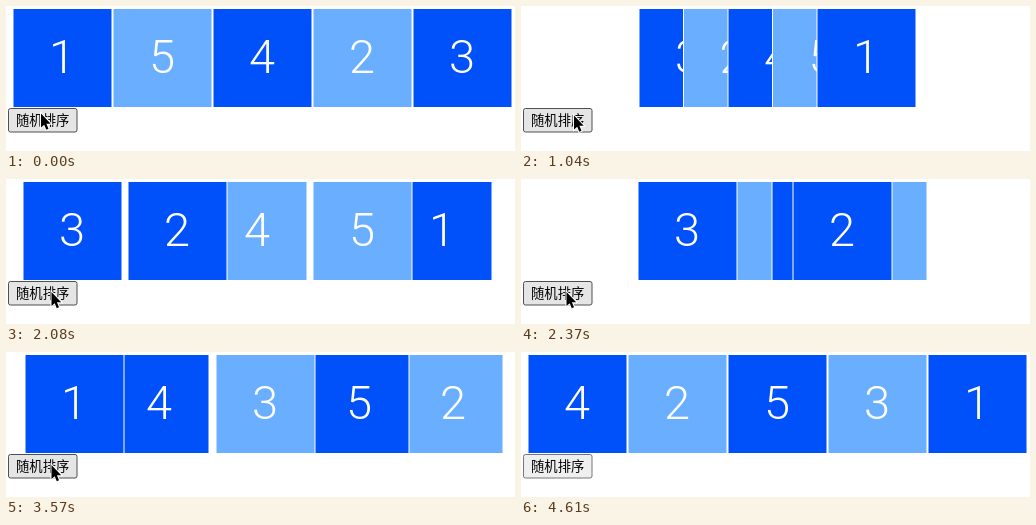
Write an HTML page that moves like this. It is 509 px wide and 145 px high and loops after 4760 ms.

```html
<!DOCTYPE html>
<html lang="zh-CN">
<head>
<meta charset="utf-8">
<title>随机排序</title>
<style>
  html, body { margin: 0; width: 100%; height: 100%; overflow: hidden; background: #fff; }
  svg { display: block; width: 509px; height: 145px; }
  .digit { font: 300 47px Roboto, "Liberation Sans", sans-serif; fill: #fff; text-anchor: middle; }
  .label { font: 13.333px "Noto Sans CJK SC", "Noto Sans CJK", sans-serif; fill: #000; }
</style>
</head>
<body>
<svg viewBox="0 0 509 145">
  <g id="row"></g>
  <rect id="button" x="2.5" y="102.5" width="68.5" height="23.5" rx="2"/>
  <text class="label" x="10" y="118.5">随机排序</text>
  <path id="cursor" d="M0 0V14L3.2 11.2L5.3 16.2L7.5 15.3L5.4 10.3H9.7Z"
    fill="#000" stroke="#fff" stroke-width="2" paint-order="stroke"/>
</svg>
<script>
const LOOP = 4760, TICKS = 32, TICK = LOOP / TICKS;
const PITCH = 100, LEFT = 6.5, TOP = 2;
const DARK = '#0051fa', LIGHT = '#6aafff';

// Each shuffle slides linearly for four ticks from its start.
const SLIDE = 4;
const STARTS = [4.11, 13.8, 23.88];
const ORDERS = ['15423', '32451', '14352', '42531'];
const PRESS = 4;

// Pointer path: [tick, x, y], straight between points
const PATH = [
  [5, 35, 107.5], [7, 53, 109.5], [11, 45.5, 113], [24, 45.5, 113], [25, 54, 114],
  [26, 262.3, 117.5], [28, 322, 118], [29, 322, 126], [30, 440, 143], [31, 500, 170]
];

const byId = id => document.getElementById(id);
const clamp = v => Math.min(1, Math.max(0, v));
const mix = (a, b, p) => a + (b - a) * p;

function add(parent, tag, attrs = {}) {
  const el = document.createElementNS('http://www.w3.org/2000/svg', tag);
  set(el, attrs);
  return parent.appendChild(el);
}

function set(el, attrs) {
  for (const k in attrs) el.setAttribute(k, attrs[k]);
}

// One tile per slot; later slots paint over earlier ones.
const tiles = Array.from(ORDERS[0], (_, slot) => {
  const g = add(byId('row'), 'g');
  add(g, 'rect', { width: 100, height: 100, fill: '#fff' });
  add(g, 'rect', { x: 1, y: 1, width: 98, height: 98, fill: slot % 2 ? LIGHT : DARK });
  const digit = add(g, 'text', { class: 'digit', x: 49.5, y: 65.3 });
  return { g, digit };
});

function drawTiles(tick) {
  const n = STARTS.filter(s => s <= tick).length;
  const to = ORDERS[n], from = ORDERS[Math.max(0, n - 1)];
  const p = n ? clamp((tick - STARTS[n - 1]) / SLIDE) : 1;
  tiles.forEach(({ g, digit }, slot) => {
    const x = LEFT + PITCH * mix(from.indexOf(to[slot]), slot, n ? p : 0);
    set(g, { transform: `translate(${x} ${TOP})` });
    digit.textContent = to[slot];
  });
}

function pointer(tick) {
  const i = PATH.findIndex(k => k[0] >= tick);
  const b = PATH[i], a = PATH[Math.max(0, i - 1)];
  const p = a === b ? 0 : (tick - a[0]) / (b[0] - a[0]);
  return [mix(a[1], b[1], p), mix(a[2], b[2], p)];
}

const over = tick => pointer(tick)[0] < 71;

// The fill lets go of its hover colour one tick after the border.
function drawButton(tick) {
  const pressed = tick === PRESS;
  set(byId('button'), {
    fill: pressed ? '#f5f5f5' : over(tick - 1) ? '#e5e5e5' : '#efefef',
    stroke: pressed ? '#8d8d8d' : over(tick) ? '#4f4f4f' : '#767676'
  });
}

function draw(t) {
  const tick = Math.min(TICKS - 1, Math.floor((t + 10) / TICK));
  drawTiles(tick);
  drawButton(tick);
  set(byId('cursor'), { transform: `translate(${pointer(tick)})` });
}

const begin = performance.now();
function frame() {
  draw((performance.now() - begin) % LOOP);
  requestAnimationFrame(frame);
}
frame();
</script>
</body>
</html>
```
